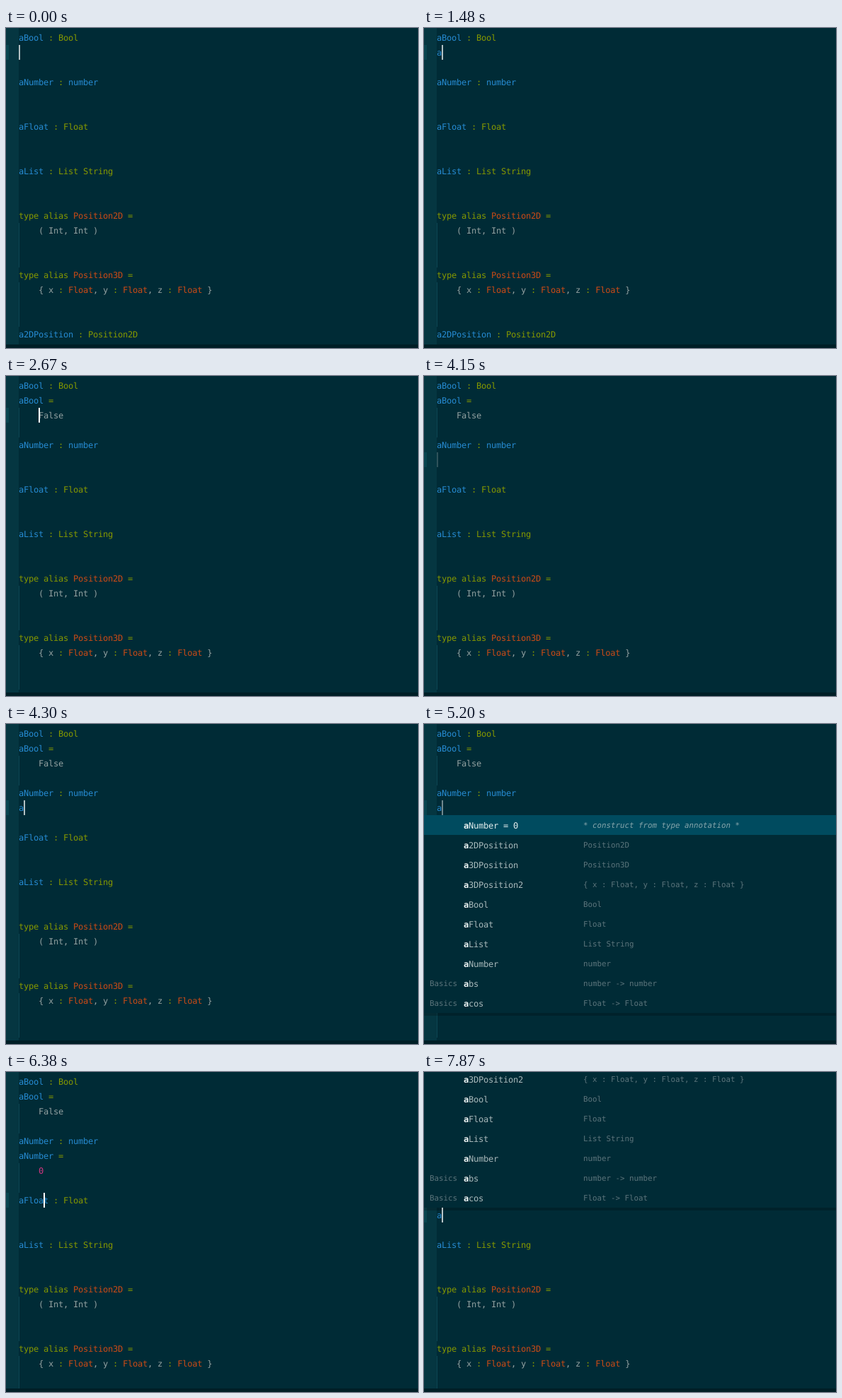
Write an HTML page that moves like this. It is 582 px wide and 453 px high and loops after 8 s.

```html
<!DOCTYPE html>
<html lang="en">
<head>
<meta charset="utf-8">
<title>Elm completion</title>
<style>
  html, body { margin: 0; width: 100%; height: 100%; overflow: hidden; background: #002b36; }
  svg { display: block; width: 582px; height: 453px; }
  text {
    font: 12px "DejaVu Sans Mono", monospace;
    letter-spacing: -.224px;
    white-space: pre;
    text-rendering: geometricPrecision;
    fill: #93a1a1;
  }
  .blue { fill: #268bd2; }
  .green { fill: #859900; }
  .orange { fill: #cb4b16; }
  .pink { fill: #d33682; }
  .word { fill: #a9b9bb; }
  .hit { font-weight: bold; fill: #eef4f4; }
  .note { font-size: 10.8px; letter-spacing: 0; fill: #5b747b; }
  .picked.word { fill: #e6eeee; }
  .picked.note { font-style: italic; fill: #86a5ab; }
</style>
</head>
<body>
<svg viewBox="0 0 582 453">
  <rect width="582" height="453" fill="#002b36"/>
  <rect width="18" height="448" fill="#053641"/>
  <g id="code"></g>
  <g id="popup"></g>
  <g id="caret"></g>
  <rect y="448" width="582" height="5" fill="#001e26"/>
</svg>
<script>
const LOOP = 8000, TICK = 148, LAST = 53;
const LINE = 21, CHAR = 7, LEFT = 18, ITEM = 28;
const layer = id => document.getElementById(id);
const rowTop = row => 3 + row * LINE;

const span = (cls, s) => `<tspan class="${cls}">${s}</tspan>`;
const rect = (x, y, w, h, fill, alpha = 1) =>
  `<rect x="${x}" y="${y}" width="${w}" height="${h}" fill="${fill}" opacity="${alpha}"/>`;
const text = (x, y, s, cls = '') => `<text x="${x}" y="${y}" class="${cls}">${s}</text>`;

// Code lines; "guide" marks lines inside an indented block
const sig = (name, type, cls = 'green') =>
  ({ s: span('blue', name) + span('green', ' : ') + span(cls, type) });
const head = name => ({ s: span('blue', name) + span('green', ' =') });
const body = s => ({ s: '    ' + s, guide: true });
const alias = name => ({ s: span('green', 'type alias ') + span('orange', name) + span('green', ' =') });
const typed = { s: span('blue', 'a') };
const gap = { s: '' }, inner = { s: '', guide: true };
const field = name => name + span('green', ' : ') + span('orange', 'Float');

// stage: 0 empty, 1 first letter typed, 2 definition filled in
const define = (stage, name, value) =>
  stage === 2 ? [head(name), body(value), inner] : [stage ? typed : gap, gap];

const lines = ([bool, number, float]) => [
  sig('aBool', 'Bool'), ...define(bool, 'aBool', 'False'),
  sig('aNumber', 'number', 'blue'), ...define(number, 'aNumber', span('pink', '0')),
  sig('aFloat', 'Float'), ...define(float, 'aFloat', '0.0'),
  sig('aList', 'List String'), gap, gap,
  alias('Position2D'), body('( Int, Int )'), inner, inner,
  alias('Position3D'), body(`{ ${['x', 'y', 'z'].map(field).join(', ')} }`), inner, inner,
  sig('a2DPosition', 'Position2D'), gap
];

const drawCode = stages => lines(stages).map(({ s, guide }, row) => {
  const y = rowTop(row);
  return (guide ? rect(LEFT, y, 1, LINE, '#0c4653') : '') + text(LEFT, y + 15, s);
}).join('');

// Completion list
const ITEMS = [
  ['2DPosition', 'Position2D'],
  ['3DPosition', 'Position3D'],
  ['3DPosition2', '{ x : Float, y : Float, z : Float }'],
  ['Bool', 'Bool'],
  ['Float', 'Float'],
  ['List', 'List String'],
  ['Number', 'number'],
  ['bs', 'number -&gt; number', 'Basics'],
  ['cos', 'Float -&gt; Float', 'Basics']
];
const POPUPS = [
  { top: 45, x: 6, note: 232, first: 'Bool = False' },
  { top: 129, x: 8, note: 225, first: 'Number = 0' },
  { top: -88, x: 8, note: 225, first: 'Float = 0.0' }
];

function drawPopup(p) {
  if (!p) return '';
  const all = [[p.first, '* construct from type annotation *'], ...ITEMS];
  const height = all.length * ITEM;
  return rect(0, p.top, 582, height, '#002b36') +
    rect(0, p.top, 582, ITEM, '#004b5f') +
    rect(0, p.top + height, 582, 4, '#000', .2) +
    all.map(([rest, note, module = ''], i) => {
      const y = p.top + i * ITEM, picked = i ? '' : ' picked';
      return text(p.x, y + 18, module, 'note') +
        text(p.x + 48, y + 19, span('hit', 'a') + rest, 'word' + picked) +
        text(p.note, y + 18, note, 'note' + picked);
    }).join('');
}

// tick, caret row, caret column, stages, popup, soft start of the caret
const STEPS = [
  [0, 1, 0, [0, 0, 0], -1, true],
  [10, 1, 1, [1, 0, 0], -1, true],
  [11, 1, 1, [1, 0, 0], 0],
  [18, 2, 4, [2, 0, 0], -1],
  [22, 3, 0, [2, 0, 0], -1],
  [23, 4, 4, [2, 0, 0], -1],
  [24, 5, 0, [2, 0, 0], -1],
  [29, 5, 1, [2, 1, 0], -1, true],
  [30, 5, 1, [2, 1, 0], 1],
  [37, 6, 5, [2, 2, 0], -1],
  [42, 7, 0, [2, 2, 0], -1],
  [43, 8, 5, [2, 2, 0], -1],
  [44, 9, 0, [2, 2, 0], -1],
  [45, 9, 0, [2, 2, 0], -1],
  [50, 9, 1, [2, 2, 1], -1, true],
  [51, 9, 1, [2, 2, 1], 2]
];

// Solid after a key press, then a soft pulse
function caretAlpha(age, soft) {
  if (age === 0 && soft) return .7;
  if (age < 3) return 1;
  return .5 + .5 * Math.cos((age * TICK - 305) / 800 * 2 * Math.PI);
}

let shownTick = -1, shownStep = null;

function draw(tick) {
  const step = STEPS.filter(s => s[0] <= tick).pop();
  const [start, row, col, stages, popup, soft] = step;
  if (step !== shownStep) {
    layer('code').innerHTML = rect(0, rowTop(row), 4, LINE, '#08444f') + drawCode(stages);
    layer('popup').innerHTML = drawPopup(POPUPS[popup]);
    shownStep = step;
  }
  // An opening popup does not restart the pulse
  const since = popup < 0 ? start : start - 1;
  layer('caret').innerHTML = rect(LEFT + col * CHAR, rowTop(row), 2, LINE, '#fff',
    caretAlpha(tick - since, soft));
}

function loop() {
  const tick = Math.min(LAST, Math.floor(performance.now() % LOOP / TICK));
  if (tick !== shownTick) draw(shownTick = tick);
  requestAnimationFrame(loop);
}
loop();
</script>
</body>
</html>
```
